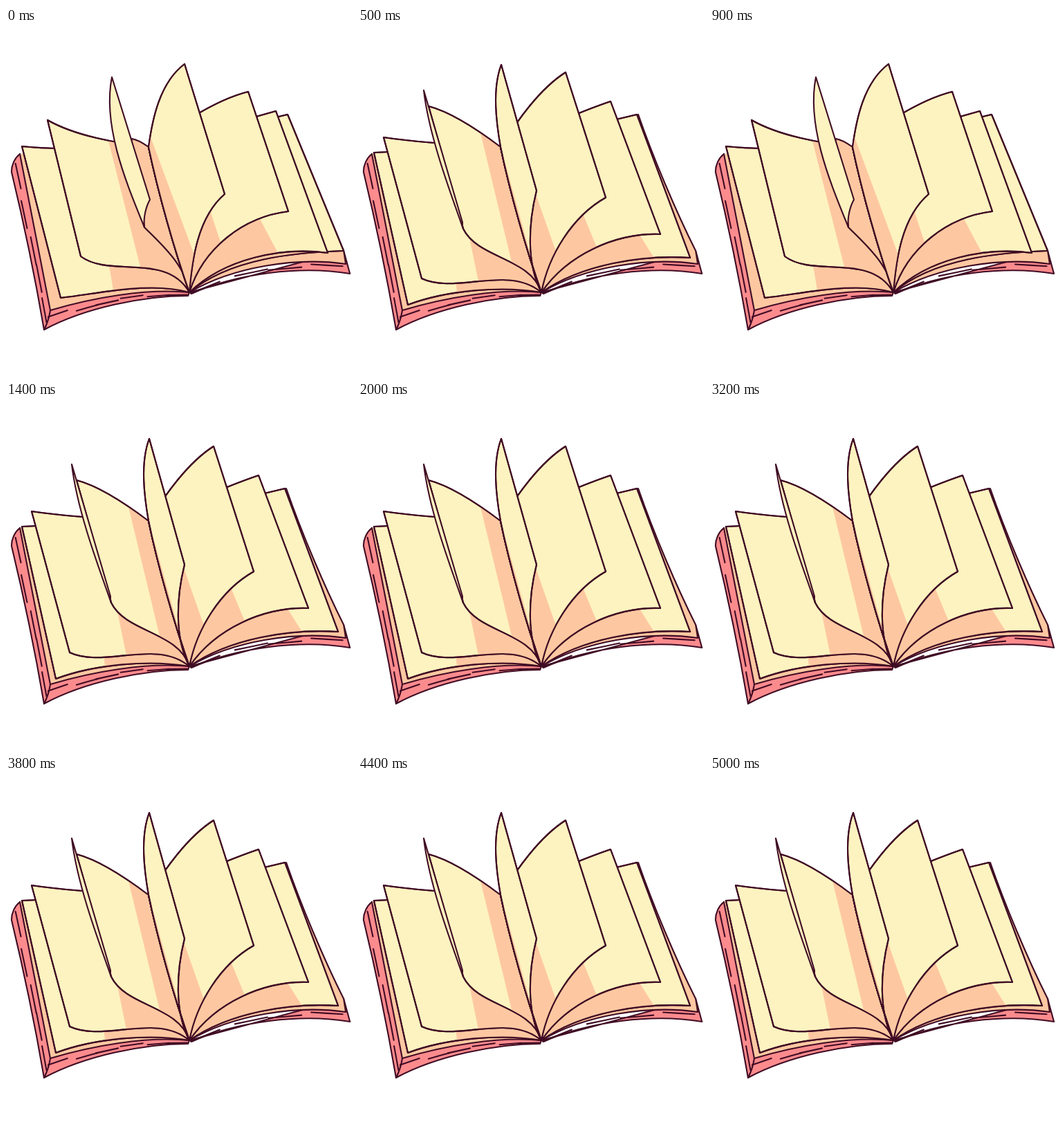
These frames come from a looping animation (500 by 500 pixels, 5.11 s). An HTML page with a canvas:

```html
<!DOCTYPE html>
<html lang="en">
<head>
<meta charset="utf-8">
<title>Book</title>
<style>
html, body { margin: 0; width: 100%; height: 100%; overflow: hidden; background: #fff; }
canvas { display: block; width: 500px; height: 500px; }
</style>
</head>
<body>
<canvas id="stage" width="500" height="500"></canvas>
<script>
const ctx = document.getElementById('stage').getContext('2d');
const CREAM = '#fdf3c0', PEACH = '#fdc8a1', PINK = '#fc8b8d', INK = '#400c24';
const STEP = 100, LOOP = 5110, LAST = 50, POSES = 3;

const mix = (a, b, t) => a.map((v, i) => v + (b[i] - v) * t);

// Cubic from p to q whose handles stand off the chord by a and b of its length.
function arc(p, q, a = 0, b = a) {
  const n = [q[1] - p[1], p[0] - q[0]];
  const handle = (t, bow) => mix(p, q, t).map((v, i) => v + n[i] * bow);
  return [p, handle(.3, a), handle(.7, b), q];
}

function at([p, c, d, q], t) {
  const u = 1 - t;
  return p.map((v, i) => u * u * u * v + 3 * u * u * t * c[i] + 3 * u * t * t * d[i] + t * t * t * q[i]);
}

function chain(...arcs) {
  const path = new Path2D();
  path.moveTo(...arcs[0][0]);
  for (const [p, c, d, q] of arcs) {
    path.lineTo(...p);
    path.bezierCurveTo(...c, ...d, ...q);
  }
  return path;
}

function paint(path, fill) {
  ctx.fillStyle = fill;
  ctx.fill(path);
  ctx.stroke(path);
}

// All leaves share the spine.
const HEAD = [206, 172], FOOT = [265, 382];
const spine = arc(FOOT, HEAD, .02);

// A leaf: tip x y, corner x y, bow of the top edge, two bows of the bottom edge.
// Each turns from its first state to its second in two steps, then the next leaf
// to the right takes its place. Listed from right to left.
const leaves = [
  [[407, 125, 488, 322, 0, -.07, -.14], [403, 125, 480, 332, 0, -.09, -.12]],
  [[390, 120, 465, 325, 0, -.13, -.16], [365, 106, 437, 298, .02, -.16, -.17]],
  [[350, 92, 408, 265, .08, -.19, -.2], [300, 64, 358, 245, .09, -.15, -.13]],
  [[258, 52, 316, 240, .17, -.17, -.08], [207, 53, 258, 235, .11, -.09, -.14]],
  [[181, 160, 200, 288, -.1, .06, .15], [102, 113, 152, 290, -.08, -.14, .2]],
  [[60, 133, 108, 330, .08, -.1, .27], [37, 158, 92, 362, .02, -.1, .2]],
  [[23, 171, 79, 390, .03, .02, .1], [23, 180, 72, 400, 0, .08, .08]]
];

// The rolled edge of the upright leaf: tip, lip, amount of curl.
const UPRIGHT = 4;
const roll = [[153, 71, 208, 248, .13], [95, 90, 151, 281, .05]];

function drawLeaf([tx, ty, cx, cy, bow, b1, b2], curl) {
  const tip = [tx, ty], corner = [cx, cy];
  const top = arc(HEAD, tip, bow / 2, bow), bottom = arc(corner, FOOT, b1, b2);
  const page = chain(spine, top, arc(tip, corner), bottom);
  paint(page, CREAM);

  // Shade grows along both edges as the leaf lies flatter.
  const width = Math.abs(cx - FOOT[0]), extra = (curl * 8) ** 4;
  const high = Math.min(1, width / 400 + extra);
  const low = Math.min(1, .36 + .3 * (width / 200) ** 4 + extra);
  const shade = chain(spine, arc(at(top, high / 2), at(top, high)),
    arc(at(top, high), at(bottom, 1 - low)));
  ctx.save();
  ctx.clip(page);
  ctx.fillStyle = PEACH;
  ctx.fill(shade);
  ctx.restore();
  ctx.stroke(page);
}

function drawRoll([tx, ty, lx, ly, curl], corner) {
  const tip = [tx, ty], lip = [lx, ly];
  paint(chain(arc(tip, lip), arc(lip, corner, -.1), arc(corner, tip, curl * .4, curl)), CREAM);
}

// Covers and page blocks.
const shoulder = [8, 208], heel = [55, 436], toe = [497, 355], blockTop = [20, 182], blockLow = [64, 408];
const rightTop = [405, 125], rightLow = [488, 322];
const coverSide = arc(shoulder, heel, .01), blockSide = arc(blockTop, blockLow);
const coverLeft = arc(heel, [263, 387], .08, .07), blockLeft = arc(blockLow, FOOT, .05, .07);
const coverRight = arc([268, 384], toe, .09), blockRight = arc(FOOT, [491, 341], .11, .1);
const rightSide = arc(rightTop, rightLow, -.02);

// Loose strokes between an outer and an inner edge.
function streaks(outer, inner, count, seed) {
  const rand = () => (seed = seed * 16807 % 2147483647) / 2147483647;
  for (let i = 0; i < count; i++) {
    const t = (i + .4 * rand()) / count, depth = .25 + .5 * rand();
    const on = s => mix(at(outer, s), at(inner, s), depth);
    ctx.stroke(chain(arc(on(t), on(Math.min(1, t + .6 / count + .05)))));
  }
}

function drawBase() {
  paint(chain(arc(blockTop, shoulder, -.15), coverSide, coverLeft, arc(FOOT, blockTop)), PINK);
  paint(chain(coverRight, arc(toe, rightLow), arc(rightLow, FOOT)), PINK);
  paint(chain(blockSide, blockLeft, arc(FOOT, HEAD, .02)), PEACH);
  paint(chain(rightSide, arc(rightLow, blockRight[3]), [...blockRight].reverse()), PEACH);
  ctx.stroke(chain(arc(blockLow, heel, .05)));
  streaks(coverSide, blockSide, 5, 11);
  streaks(coverLeft, blockLeft, 6, 29);
  streaks(coverRight, blockRight, 4, 47);
}

function draw(pose) {
  const t = pose / (POSES - 1), curled = mix(...roll, t);
  ctx.clearRect(0, 0, 500, 500);
  ctx.strokeStyle = INK;
  ctx.lineWidth = 2.1;
  ctx.lineCap = ctx.lineJoin = 'round';
  drawBase();
  for (const i of [6, 5, 4, 0, 1, 2, 3]) {
    const leaf = mix(...leaves[i], t), upright = i === UPRIGHT;
    drawLeaf(leaf, upright ? curled[4] : 0);
    if (upright) drawRoll(curled, leaf.slice(2, 4));
  }
}

let shown = -1;
function tick() {
  const step = Math.min(LAST, Math.floor(performance.now() % LOOP / STEP));
  const pose = step % POSES;
  if (pose !== shown) draw(shown = pose);
  requestAnimationFrame(tick);
}
tick();
</script>
</body>
</html>
```
